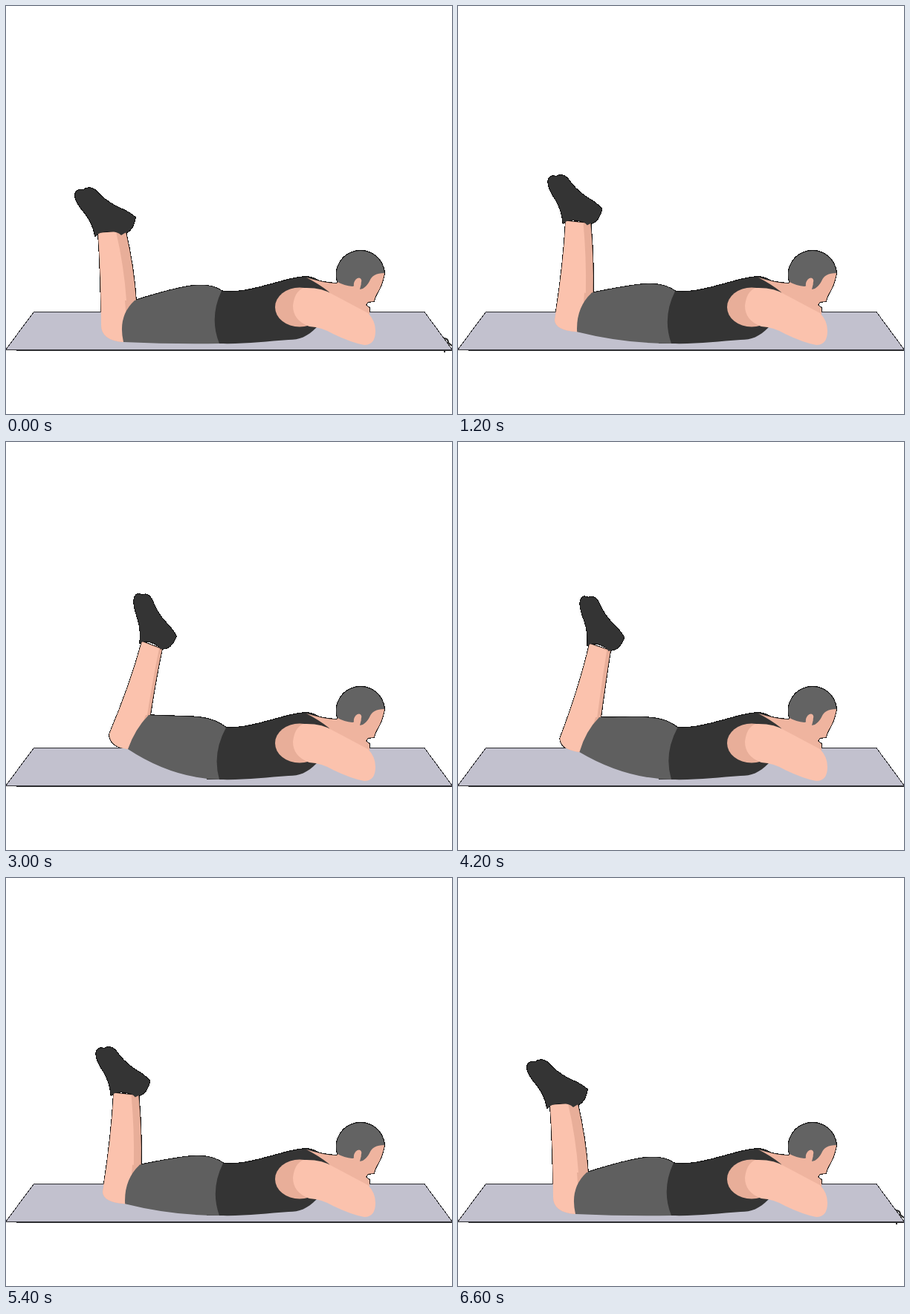
An HTML page that plays this animation: 600x550 px, repeating every 7200 ms.

```html
<!DOCTYPE html>
<html lang="en">
<head>
<meta charset="utf-8">
<title>Prone leg lift</title>
<style>
  html, body { margin: 0; width: 100%; height: 100%; overflow: hidden; background: #fff; }
  svg { display: block; width: 100%; height: 100%; }
  .skin { fill: #fbc2ad; }
  .shade { fill: #e8ae99; }
  .face { fill: #efb49f; }
  .black { fill: #343434; }
  .shorts { fill: #5f5f5f; }
  .hair { fill: #636363; }
  .edge { stroke: #111; stroke-width: 2; stroke-linejoin: round; shape-rendering: crispEdges; }
  .mat { fill: #c2c1ce; stroke: #2c2c30; shape-rendering: crispEdges; }
</style>
</head>
<body>
<svg viewBox="0 0 600 550">
  <defs>
    <clipPath id="aboveMat"><rect width="600" height="412"/></clipPath>
    <g id="body">
      <path id="calf" class="shade"/>
      <path id="shin" class="skin"/>
      <path id="shoe" class="black" d="M0 0Q-3 -17 -13 -30Q-27 -46 -27 -55Q-26 -64 -16 -62Q-8 -68 1 -61Q14 -46 34 -37Q46 -32 54 -25Q51 -7 40 -4L35 -1Q30 -6 20 -6Q8 -7 0 0Z"/>
      <path class="black" d="M288 384C310 388 335 381 357 375S392 365 406 365Q424 368 436 387L418 433C405 446 395 450 380 450C350 452 320 456 287 455H270V384Z"/>
      <path id="shorts" class="shorts"/>
      <path class="face" d="M404 366Q425 373 445 374L470 340H500L509 361Q506 376 500 386Q497 390 495 398L487 399L484 403L489 407V416L445 400L434 385Q420 374 404 366Z"/>
      <path class="hair" d="M446 372A32.3 32.3 0 1 1 509 360Q493 360 489 371Q486 377 480 381L476 382L478 374L466 378Q455 377 446 372Z"/>
      <ellipse class="face" rx="4.5" ry="7" transform="translate(473 373) rotate(30)"/>
      <ellipse class="shade" cx="395" cy="406" rx="33" ry="26.5"/>
      <path class="skin" d="M400 380Q425 379 440 389L487 414Q497 424 497 438Q497 457 482 457Q465 454 440 442Q425 433 408 432Q386 424 386 404Q388 385 400 380Z"/>
    </g>
  </defs>
  <path class="mat" d="M37.5 412.5H563L600.5 463.5H-.5Z"/>
  <path class="mat" d="M14 464.5H600"/>
  <path id="scuff" fill="none" stroke="#222" stroke-width="2" d="M589 448q6 0 6 6l5 4M589 466h2"/>
  <use href="#body" class="edge" clip-path="url(#aboveMat)"/>
  <use href="#body"/>
</svg>
<script>
const stepTime = 600;
const lifts = [0, .14, .355, .62, .9, 1]; // lowered to raised, then back again
const early = .8, late = 1.6;             // exponents for parts that lead or lag

const byId = id => document.getElementById(id);

function pose(t) {
  const mix = (low, high, power = 1) => low + (high - low) * t ** power;
  const at = (x0, y0, x1, y1, powerX = 1, powerY = 1) =>
    [mix(x0, x1, powerX), mix(y0, y1, powerY)];

  const shinTop = at(124, 306, 183, 269, 1, early);
  const shinBend = at(128, 365, 167, 328);
  const knee = at(128, 430, 139, 394, late, late);
  const kneecap = at(128, 451, 140, 411, late);
  const calfTop = at(161, 304, 210, 279, 1, early);
  const calfBend = at(172, 352, 202, 316);
  const hemTop = at(173, 397, 192, 368);
  const hemBend = at(150, 418, 174, 386);
  const hemBottom = at(158, 453, 164, 414);
  const waist = at(290, 384, 296, 385);

  const leg = inset => {
    const back = ([x, y]) => [x - inset, y];
    return `M${shinTop}Q${shinBend} ${knee}Q${kneecap} ${hemBottom}h6
      L${back(hemTop)}h2Q${back(calfBend)} ${back(calfTop)}Z`;
  };
  byId('calf').setAttribute('d', leg(0));
  byId('shin').setAttribute('d', leg(mix(13, 4)));

  byId('shorts').setAttribute('d', `M${hemTop}Q${hemBend} ${hemBottom}
    Q${at(223, 456, 223, 453)} 287,455Q${at(273, 420, 277, 420)} ${waist}
    C270,${mix(370, 365)} ${at(240, 376, 245, 372)} ${hemTop}Z`);

  // The foot turns with the shin and foreshortens slightly.
  const turn = [...at(1, 0, .79, .281), ...at(0, 1, -.254, .968)];
  byId('shoe').setAttribute('transform',
    `matrix(${[...turn, ...at(120, 310, 180, 271, 1, early)]})`);

  byId('scuff').style.display = t ? 'none' : '';
}

const start = performance.now();
let shown;
function tick() {
  const step = Math.floor((performance.now() - start) / stepTime) % (2 * lifts.length);
  const t = lifts[Math.min(step, 2 * lifts.length - 1 - step)];
  if (t !== shown) pose(shown = t);
  requestAnimationFrame(tick);
}
tick();
</script>
</body>
</html>
```
